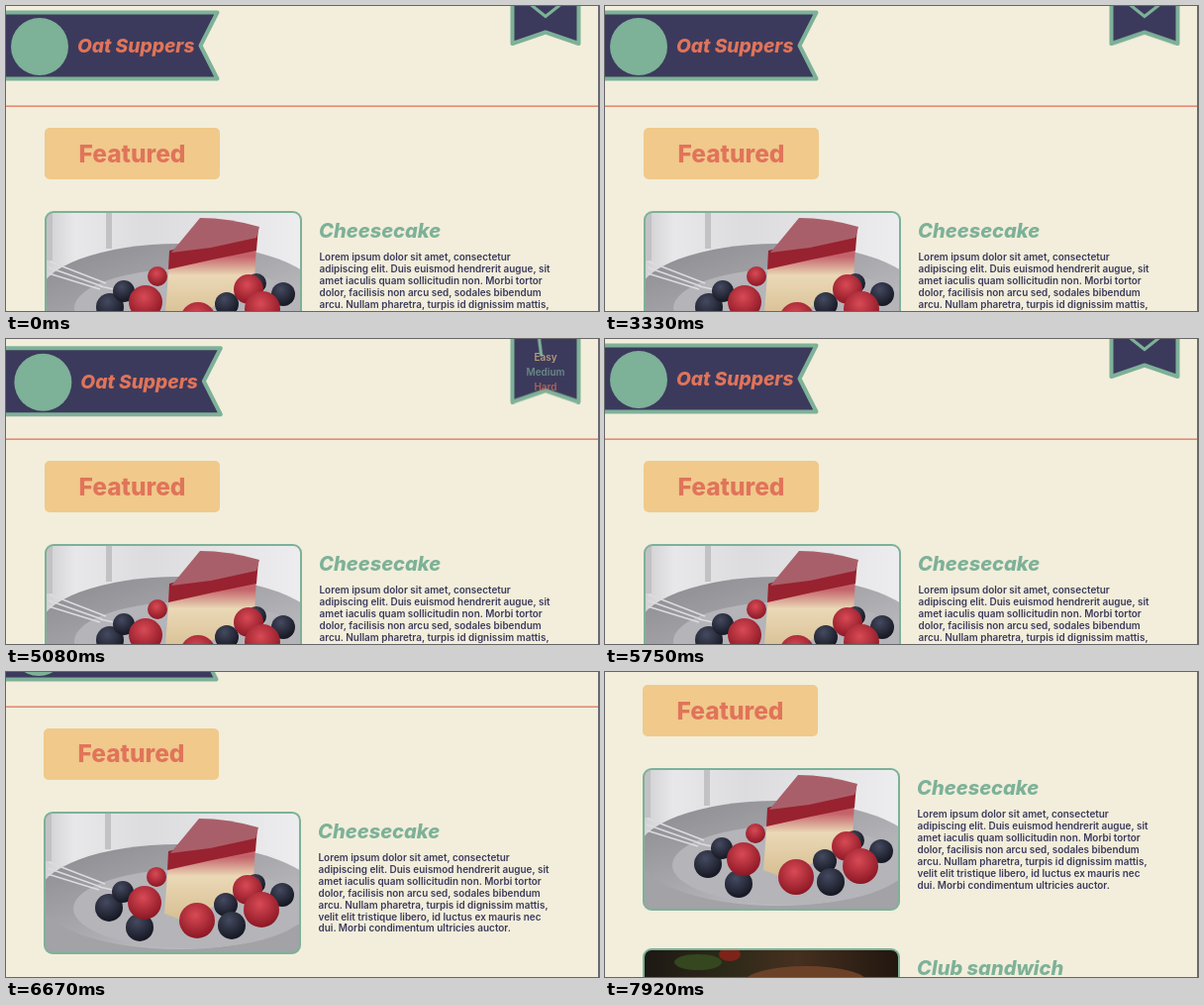
These frames come from a looping animation (599x308 px, 8 s). An HTML page:

```html
<!DOCTYPE html>
<html lang="en">
<head>
<meta charset="utf-8">
<title>Recipes</title>
<style>
  :root { --cream: #f2eedb; --navy: #3c3a5c; --green: #7db198; --coral: #e0745a; --sand: #f0c98b; }
  html, body { margin: 0; width: 100%; height: 100%; overflow: hidden; background: var(--cream); }
  svg { display: block; width: 100%; height: 100%; font-family: Inter, Roboto, sans-serif; }

  .nudge, .page, .banner, .ribbon, .chevron, .levels { animation: 8s linear infinite; }
  .nudge { animation-name: nudge; animation-timing-function: step-end; }
  .page { animation-name: scroll; }
  .banner { animation-name: banner; }
  .ribbon { animation-name: ribbon; }
  .chevron { animation-name: flip; transform-origin: 545px 2.8px; }
  .levels { animation-name: reveal; }

  @keyframes nudge {
    0%, 83.5%, 100% { transform: none; }
    77.5%, 97% { transform: translateX(-1px); }
  }
  @keyframes scroll {
    0% { transform: none; }
    76.56% { transform: none; animation-timing-function: ease; }
    96.2%, 100% { transform: translateY(-110px); }
  }
  @keyframes banner {
    0%, 70.9%, 100% { transform: none; }
    41.6% { transform: none; animation-timing-function: ease; }
    51%, 61.5% { transform: translate(5px, 4px); animation-timing-function: ease; }
  }
  @keyframes ribbon {
    0%, 70.9%, 100% { transform: none; }
    41.6% { transform: none; animation-timing-function: ease; }
    51%, 61.5% { transform: translateY(38px); animation-timing-function: ease; }
  }
  @keyframes flip {
    0%, 70.9%, 100% { transform: none; }
    41.6% { transform: none; animation-timing-function: ease; }
    51%, 61.5% { transform: rotate(180deg); animation-timing-function: ease; }
  }
  @keyframes reveal {
    0%, 70.9%, 100% { opacity: 0; }
    41.6% { opacity: 0; animation-timing-function: ease; }
    51%, 61.5% { opacity: 1; animation-timing-function: ease; }
  }

  .flag { fill: var(--navy); stroke: var(--green); stroke-width: 4; stroke-linejoin: round; }
  .frame { fill: none; stroke: var(--green); stroke-width: 2; }
  .brand { font: italic 800 19.2px Inter, sans-serif; fill: var(--coral); }
  .heading { font-size: 24.5px; font-weight: 800; fill: var(--coral); text-anchor: middle; }
  .name { font: italic 800 20.1px Inter, sans-serif; fill: var(--green); }
  .body { font-size: 9.95px; font-weight: 600; fill: var(--navy); }
  .levels { font-size: 10px; font-weight: 600; text-anchor: middle; }
</style>
</head>
<body>
<svg viewBox="0 0 599 308" preserveAspectRatio="none">
  <defs>
    <clipPath id="card"><rect x="1" y="1" width="258" height="142" rx="8"/></clipPath>
    <linearGradient id="wall" x2="1" y2="0">
      <stop offset="0" stop-color="#cfcfd1"/>
      <stop offset=".12" stop-color="#e8e8ea"/>
      <stop offset=".4" stop-color="#dcdcde"/>
      <stop offset="1" stop-color="#ededef"/>
    </linearGradient>
    <linearGradient id="plate" x2="1" y2="1">
      <stop offset="0" stop-color="#88888d"/>
      <stop offset=".5" stop-color="#a9a9ae"/>
      <stop offset="1" stop-color="#cdcdd1"/>
    </linearGradient>
    <linearGradient id="sponge" x2="0" y2="1">
      <stop offset=".15" stop-color="#c4626a"/>
      <stop offset=".4" stop-color="#ead8b6"/>
      <stop offset="1" stop-color="#d6bd90"/>
    </linearGradient>
    <radialGradient id="blue" cx=".4" cy=".3" r=".7">
      <stop offset="0" stop-color="#454a60"/>
      <stop offset="1" stop-color="#151722"/>
    </radialGradient>
    <radialGradient id="red" cx=".45" cy=".35" r=".65">
      <stop offset="0" stop-color="#d84a55"/>
      <stop offset="1" stop-color="#8c1724"/>
    </radialGradient>
    <linearGradient id="dark" x2="1" y2="0">
      <stop offset="0" stop-color="#1d1814"/>
      <stop offset=".3" stop-color="#2b2818"/>
      <stop offset=".6" stop-color="#46301f"/>
      <stop offset="1" stop-color="#21160f"/>
    </linearGradient>
  </defs>

  <g class="nudge"><g class="page">
    <rect x="-2" y="100.5" width="604" height="1.3" fill="var(--coral)"/>

    <g class="banner">
      <path class="flag" d="M-20 6.5H213.5L196.5 40 213.5 73.5H-20Z"/>
      <circle cx="34" cy="41" r="29" fill="var(--green)"/>
      <text class="brand" x="72" y="47">Oat Suppers</text>
    </g>

    <path class="flag ribbon" d="M511.5-60H578.5V38L545 26.5 511.5 38Z"/>
    <path class="chevron" d="M530.5-1 545 10.5 559.5-1" fill="none" stroke="var(--green)" stroke-width="3"/>
    <g class="levels">
      <text x="545" y="21.5" fill="var(--sand)">Easy</text>
      <text x="545" y="36.8" fill="var(--green)">Medium</text>
      <text x="545" y="52" fill="var(--coral)">Hard</text>
    </g>

    <rect x="39" y="123" width="177" height="52" rx="5" fill="var(--sand)"/>
    <text class="heading" x="127.5" y="157.5">Featured</text>

    <g transform="translate(39 207)">
      <g clip-path="url(#card)">
        <rect width="260" height="144" fill="url(#wall)"/>
        <path d="M0 0H8V50H0ZM62 0H68V38H62Z" fill="#c2c2c5"/>
        <rect y="92" width="260" height="52" fill="#a2a2a7"/>
        <ellipse cx="136" cy="86" rx="142" ry="53" fill="url(#plate)"/>
        <ellipse cx="148" cy="98" rx="118" ry="40" fill="#b4b4b9"/>
        <path d="M5 51 62 73M4 57 58 76M4 63 56 79M56 76 84 82" fill="none" stroke="#dcdce0" stroke-width="1.6"/>
        <circle cx="114" cy="66" r="10" fill="url(#red)"/>
        <path d="M126 50 214 34 212 70 146 112 122 103Z" fill="url(#sponge)"/>
        <path d="M126 40 216 16 214 40 170 49 125 59Z" fill="#98222f"/>
        <path d="M128 42 157 7Q186 7 217 16L214 27 168 37Z" fill="#a95f69"/>
        <g fill="url(#blue)">
          <circle cx="66" cy="97" r="14"/><circle cx="97" cy="117" r="14"/>
          <circle cx="80" cy="81" r="11"/><circle cx="184" cy="94" r="12"/>
          <circle cx="214" cy="73" r="10"/><circle cx="241" cy="84" r="12"/>
        </g>
        <g fill="url(#red)">
          <circle cx="102" cy="92" r="17"/><circle cx="206" cy="79" r="15"/>
          <circle cx="155" cy="110" r="18"/><circle cx="220" cy="99" r="18"/>
        </g>
        <circle cx="190" cy="115" r="14" fill="url(#blue)"/>
      </g>
      <rect class="frame" x="1" y="1" width="258" height="142" rx="8"/>
      <text class="name" x="277" y="27">Cheesecake</text>
    </g>

    <text class="body" y="257.4">
      <tspan x="316.5">Lorem ipsum dolor sit amet, consectetur</tspan>
      <tspan x="316.5" dy="11.85">adipiscing elit. Duis euismod hendrerit augue, sit</tspan>
      <tspan x="316.5" dy="11.85">amet iaculis quam sollicitudin non. Morbi tortor</tspan>
      <tspan x="316.5" dy="11.85">dolor, facilisis non arcu sed, sodales bibendum</tspan>
      <tspan x="316.5" dy="11.85">arcu. Nullam pharetra, turpis id dignissim mattis,</tspan>
      <tspan x="316.5" dy="11.85">velit elit tristique libero, id luctus ex mauris nec</tspan>
      <tspan x="316.5" dy="11.85">dui. Morbi condimentum ultricies auctor.</tspan>
    </text>

    <g transform="translate(39 389)">
      <g clip-path="url(#card)">
        <rect width="260" height="144" fill="url(#dark)"/>
        <ellipse cx="56" cy="14" rx="24" ry="8" fill="#34471f"/>
        <ellipse cx="88" cy="6" rx="11" ry="7" fill="#7d2419"/>
        <ellipse cx="165" cy="34" rx="62" ry="16" fill="#6b4227"/>
      </g>
      <rect class="frame" x="1" y="1" width="258" height="142" rx="8"/>
      <text class="name" x="277" y="27">Club sandwich</text>
    </g>
  </g></g>

  <rect x="598" width="1" height="308" fill="#6b6a72"/>
</svg>
</body>
</html>
```
